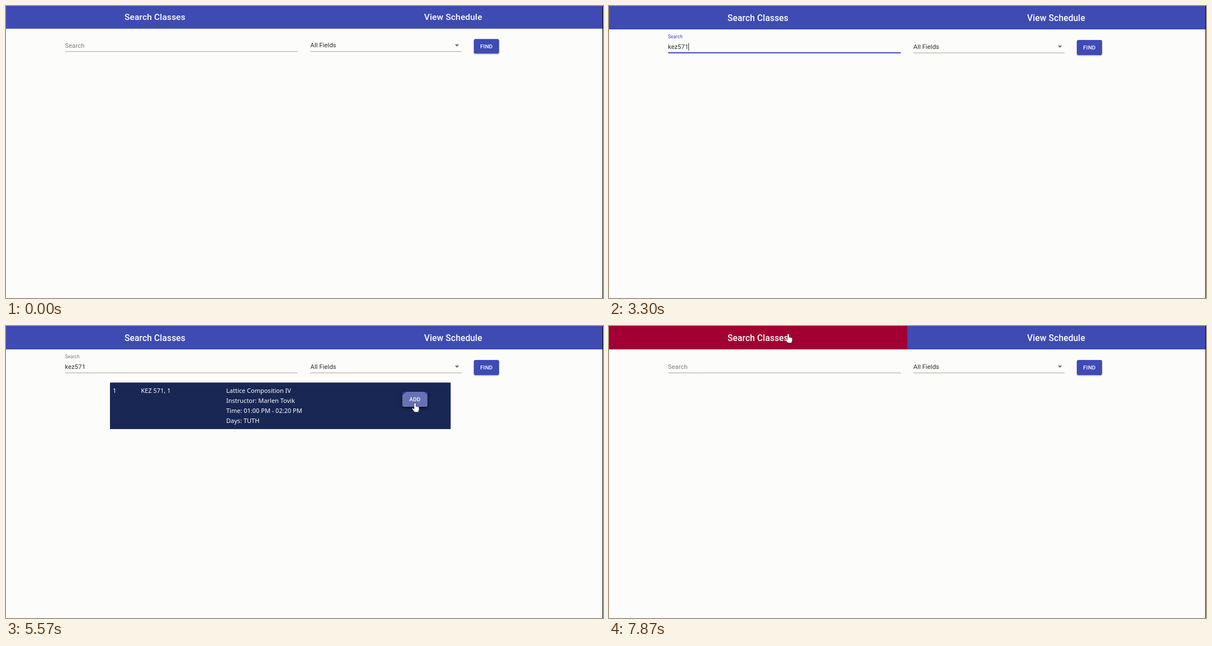
An HTML page that plays this animation: 1068 px wide and 524 px high, repeating every 8000 ms.

```html
<!DOCTYPE html>
<html lang="en">
<head>
<meta charset="utf-8">
<title>Class search</title>
<style>
html, body { margin: 0; width: 1068px; height: 524px; overflow: hidden; background: #fcfcfb; }
svg { display: block; font-family: Roboto, sans-serif; }
.tab { font-size: 15.6px; font-weight: 500; letter-spacing: .0075em; fill: #fff; text-anchor: middle; }
.input { font-size: 11.2px; letter-spacing: .00938em; fill: #2c2c2c; }
.btn text { font-size: 9.8px; font-weight: 500; letter-spacing: .02857em; fill: #fff; text-anchor: middle; }
.row { font: 11px "Noto Sans", sans-serif; fill: #fff; }
.day { font: 500 15.8px "Noto Sans", sans-serif; fill: #fff; text-anchor: middle; }
.slot { font: 10.9px "Noto Sans", sans-serif; fill: #080818; text-anchor: middle; }
.rest { filter: drop-shadow(0 1px 1.2px rgba(0, 0, 0, .4)); }
.lift { filter: drop-shadow(0 2px 3px rgba(0, 0, 0, .5)); }
</style>
</head>
<body>
<svg width="1068" height="524" viewBox="0 0 1068 524">
  <defs>
    <clipPath id="findClip"><rect x="837" y="61" width="45" height="27" rx="3"/></clipPath>
    <clipPath id="addClip"><rect x="709" y="118" width="45" height="27" rx="3"/></clipPath>
  </defs>
  <g id="app">
    <rect width="1068" height="42" fill="#3e4bb3"/>
    <rect id="hotTab" width="533.5" height="42" fill="#a20033"/>
    <g id="tabs" class="tab">
      <text x="266.5" y="26.5">Search Classes</text>
      <text x="800" y="26.5">View Schedule</text>
    </g>

    <g id="search">
      <g fill="#b7ba9c">
        <rect x="106" y="83.5" width="416" height="1.3"/>
        <rect x="544.5" y="83.5" width="270.5" height="1.3"/>
      </g>
      <rect id="focusLine" x="106" y="83" width="416" height="2" fill="#3f4bb3"/>
      <text id="label" class="input">Search</text>
      <text id="typed" class="input" x="105.5" y="77"></text>
      <rect id="caret" y="66.5" width="1" height="13.5" fill="#333"/>
      <text class="input" x="544.5" y="76.5">All Fields</text>
      <path d="M803 71h7.4l-3.7 3.9z" fill="#6c6c6c"/>
      <g id="results">
        <rect x="186" y="101.5" width="609.5" height="83.5" fill="#192754"/>
        <g class="row">
          <text x="191" y="120.3">1</text>
          <text x="241.5" y="120.3">KEZ 571, 1</text>
          <g id="info"></g>
        </g>
        <g id="add" class="btn"></g>
      </g>
      <g id="find" class="btn"></g>
    </g>

    <g id="schedule">
      <rect y="42" width="1068" height="42" fill="#a20033"/>
      <rect y="84" width="1068" height="440" fill="#1a2958"/>
      <g id="days"></g>
    </g>
  </g>

  <rect x="1067" width="1" height="524" fill="#000"/>

  <g id="cursor">
    <path id="arrow" d="M0 0v14l3.3-3 2.3 5 2-1-2.2-4.8h4.4z" fill="#fff" stroke="#222" stroke-width=".8"/>
    <path id="beam" d="M-2.5-7q2 0 2.5 1 .5-1 2.5-1M0-6V6M-2.5 7q2 0 2.5-1 .5 1 2.5 1" fill="none" stroke="#333"/>
    <path id="hand" d="M0 0q1.5 0 1.5 1.5v4.5l4.3 1q1.2.4 1.2 1.7v3.5l-1.5 4.3h-6.5l-4.3-5.3q-.8-1.6.9-2l2.4 1.6v-9.3q0-1.5 2-1.5z" fill="#fff" stroke="#333" stroke-width=".8"/>
  </g>
</svg>

<script>
const LOOP = 8000;
const $ = id => document.getElementById(id);
const set = (id, attrs) => { for (const k in attrs) $(id).setAttribute(k, attrs[k]); };
const show = (id, on) => { $(id).style.display = on ? '' : 'none'; };
const ramp = (t, start, len) => Math.min(1, Math.max(0, (t - start) / len));
const out = p => 1 - (1 - p) ** 2.5;
const smooth = p => p * p * (3 - 2 * p);

const lines = (list, x, y, gap, cls = '') =>
  list.map((s, i) => `<text class="${cls}" x="${x}" y="${y + i * gap}">${s}</text>`).join('');

function button(id, label, x, y) {
  const box = `x="${x}" y="${y}" width="45" height="27" rx="3"`;
  $(id).innerHTML = `<rect class="rest" ${box} fill="#3e4bb3"/>
    <rect class="lift" id="${id}Hot" ${box} fill="#2f3c98"/>
    <g clip-path="url(#${id}Clip)"><circle id="${id}Ripple" fill="#fff"/></g>
    <text x="${x + 22.5}" y="${y + 17.2}">${label}</text>`;
}

button('find', 'FIND', 837, 61);
button('add', 'ADD', 709, 118);
$('info').innerHTML = lines(['Lattice Composition IV', 'Instructor: Marlen Tovik',
  'Time: 01:00 PM - 02:20 PM', 'Days: TUTH'], 394, 120.3, 17.8);

['Monday', 'Tuesday', 'Wednesday', 'Thursday', 'Friday'].forEach((day, i) => {
  const mid = 177.8 + i * 177.8;
  let html = `<text class="day" x="${mid}" y="67.3">${day}</text>`;
  if (i % 2) {
    html += `<rect x="${mid - 88.4}" y="84.5" width="176.5" height="64.5" fill="#7875e6"/>` +
      lines(['KEZ 571-1', 'Marlen Tovik', '01:00 PM - 02:20 PM', 'TBA - TBA'], mid, 98, 16, 'slot');
  }
  $('days').innerHTML += html;
});

// time, x, y of the pointer; a fourth value keeps the speed constant up to that stop
const stops = [
  [730, 1067, 330], [1030, 410, 72], [3370, 410, 72], [3600, 430, 90], [3770, 430, 90],
  [4130, 875, 76], [4600, 875, 76], [5250, 732, 138], [5629, 732, 138], [5630, 800, 15],
  [5970, 800, 15], [6250, 600, 165, 1], [6600, 350, 22, 1], [6730, 324, 16],
  [6830, 324, 16], [6970, 321, 14], [LOOP, 321, 14]
];

function pointerAt(t) {
  const i = Math.max(1, stops.findIndex(s => s[0] > t));
  const a = stops[i - 1], b = stops[i];
  let p = ramp(t, a[0], b[0] - a[0]);
  if (!b[3]) p = smooth(p);
  return [a[1] + (b[1] - a[1]) * p, a[2] + (b[2] - a[2]) * p];
}

const inside = (x, y, l, t, r, b) => x >= l && x < r && y >= t && y < b;

const typing = [[1560, 1], [1830, 3], [1970, 4], [2070, 5], [2230, 6]];
const FOCUS = 1330, BLUR = 4200, PLAN = 5630, BACK = 7870;

function ripple(id, t, start, x, y, size, fade) {
  set(id, { cx: x, cy: y, r: size * out(ramp(t, start, 550)), opacity: .27 * (1 - ramp(t, fade, 320)) });
}

function draw(t) {
  const scale = t < 70 ? .97 : t < 100 ? .978 : .985 + .015 * ramp(t, 330, 140);
  set('app', { transform: `scale(1 ${scale})` });
  set('tabs', { transform: `translate(0 ${(scale - 1) * 30})` });

  const plan = t >= PLAN && t < BACK;
  const fresh = t >= BACK;
  const hasResults = t >= 4570 && t < PLAN;
  show('search', !plan);
  show('schedule', plan);
  show('results', hasResults);

  const focused = t >= FOCUS && t < BLUR;
  const raised = fresh ? 0 : out(ramp(t, FOCUS, 200));
  set('label', {
    transform: `translate(105.5 ${77 - 18.8 * raised}) scale(${1 - .25 * raised})`,
    fill: focused ? '#3f4bb3' : '#7d7d7d',
    style: `fill:${focused ? '#3f4bb3' : '#7d7d7d'}`
  });
  const line = out(ramp(t, FOCUS, 200));
  set('focusLine', {
    transform: `translate(314 0) scale(${line} 1) translate(-314 0)`,
    opacity: 1 - ramp(t, BLUR, 200)
  });
  show('focusLine', t >= FOCUS && t < BLUR + 200);

  let count = 0;
  for (const [at, n] of typing) if (t >= at && !fresh) count = n;
  $('typed').textContent = 'kez571'.slice(0, count);
  const blinkOn = t < 2230 || Math.floor((t - 2230) / 535) % 2 === 0;
  show('caret', focused && blinkOn);
  set('caret', { x: 105.5 + (count && !plan ? $('typed').getComputedTextLength() : 0) });

  set('findHot', { opacity: ramp(t, 4040, 250) - ramp(t, 4640, 250) });
  set('addHot', { opacity: ramp(t, 5130, 250) });
  ripple('findRipple', t, BLUR, 876, 80, 45, 4500);
  ripple('addRipple', t, 5300, 732, 143, 36, 5600);

  const [x, y] = pointerAt(t);
  const hand = y < 42 || !plan && inside(x, y, 837, 61, 882, 88) ||
    hasResults && inside(x, y, 709, 118, 754, 145);
  const beam = !plan && inside(x, y, 106, 60, 522, 86);
  show('cursor', t >= 730 && t < 1830 || t >= 3370);
  set('cursor', { transform: `translate(${x} ${y})` });
  show('hand', hand);
  show('beam', beam && !hand);
  show('arrow', !hand && !beam);
  show('hotTab', t > PLAN && x < 533 && y < 42);
}

const begin = performance.now();
function tick() {
  draw((performance.now() - begin) % LOOP);
  requestAnimationFrame(tick);
}
tick();
</script>
</body>
</html>
```
